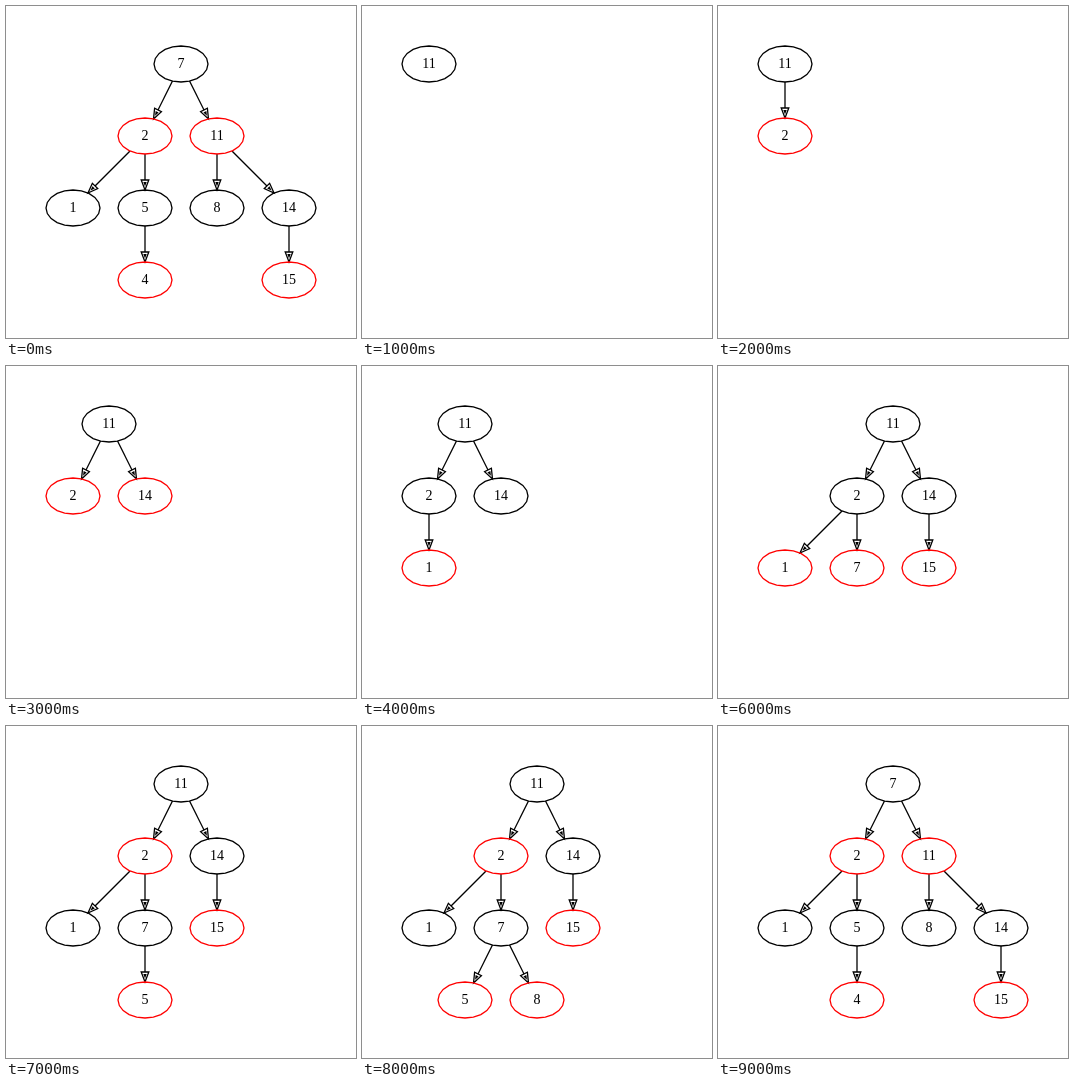
An HTML page with a canvas for the animation above (10 s loop, 350 px wide and 332 px high).

```html
<!DOCTYPE html>
<html lang="en">
<head>
<meta charset="utf-8">
<title>Red-black tree insertion</title>
<style>
  html, body { margin: 0; width: 100%; height: 100%; overflow: hidden; background: #fff; }
  canvas { display: block; }
</style>
</head>
<body>
<canvas id="stage" width="350" height="332"></canvas>
<script>
const ctx = document.getElementById('stage').getContext('2d');
const STEP = 1000;
const RX = 27, RY = 18;
const ELLIPSE_SIDES = 20;
const HEAD_LENGTH = 10, HEAD_HALF_WIDTH = 3.8;

// Columns are 36 px apart, rows 72 px; a node's row is its depth.
const black = (key, col, ...children) => ({ key, col, color: '#000', children });
const red = (key, col, ...children) => ({ key, col, color: '#f00', children });

const finished = black(7, 3,
  red(2, 2, black(1, 0), black(5, 2, red(4, 2))),
  red(11, 4, black(8, 4), black(14, 6, red(15, 6))));

const trees = [
  finished,
  black(11, 0),
  black(11, 0, red(2, 0)),
  black(11, 1, red(2, 0), red(14, 2)),
  black(11, 1, black(2, 0, red(1, 0)), black(14, 2)),
  black(11, 2, black(2, 1, red(1, 0), red(7, 2)), black(14, 3)),
  black(11, 3, black(2, 2, red(1, 0), red(7, 2)), black(14, 4, red(15, 4))),
  black(11, 3, red(2, 2, black(1, 0), black(7, 2, red(5, 2))), black(14, 4, red(15, 4))),
  black(11, 3, red(2, 2, black(1, 0), black(7, 2, red(5, 1), red(8, 3))), black(14, 4, red(15, 4))),
  finished
];

const position = (node, depth) => ({ x: 67 + 36 * node.col, y: 58 + 72 * depth });

function polygon(points) {
  ctx.beginPath();
  for (const [x, y] of points) ctx.lineTo(x, y);
  ctx.closePath();
}

function drawEdge(from, to) {
  const dx = to.x - from.x, dy = to.y - from.y;
  const clip = 1 / Math.hypot(dx / RX, dy / RY);
  const length = Math.hypot(dx, dy) * (1 - 2 * clip);
  const base = length - HEAD_LENGTH;

  ctx.save();
  ctx.translate(from.x + dx * clip, from.y + dy * clip);
  ctx.rotate(Math.atan2(dy, dx));
  ctx.strokeStyle = ctx.fillStyle = '#000';
  ctx.beginPath();
  ctx.moveTo(0, 0);
  ctx.lineTo(base, 0);
  ctx.stroke();
  polygon([[length, 0], [base, -HEAD_HALF_WIDTH], [base, HEAD_HALF_WIDTH]]);
  ctx.stroke();
  polygon([[length - 3.5, 0], [base + 2, -1.7], [base + 2, 1.7]]);
  ctx.fill();
  ctx.restore();
}

function drawNode(node, { x, y }) {
  ctx.strokeStyle = node.color;
  polygon(Array.from({ length: ELLIPSE_SIDES }, (_, i) => {
    const angle = i * 2 * Math.PI / ELLIPSE_SIDES;
    return [x + RX * Math.cos(angle), y + RY * Math.sin(angle)];
  }));
  ctx.stroke();
  ctx.fillStyle = '#000';
  ctx.fillText(node.key, x, y + 4);
}

function drawTree(node, depth = 0) {
  const here = position(node, depth);
  for (const child of node.children) {
    drawEdge(here, position(child, depth + 1));
    drawTree(child, depth + 1);
  }
  drawNode(node, here);
}

function render(time) {
  ctx.fillStyle = '#fff';
  ctx.fillRect(0, 0, 350, 332);
  ctx.lineWidth = 1.3;
  ctx.font = '14px "Liberation Serif", serif';
  ctx.textAlign = 'center';
  drawTree(trees[Math.floor(time / STEP) % trees.length]);
}

const start = performance.now();
function tick() {
  render(performance.now() - start);
  requestAnimationFrame(tick);
}
tick();
</script>
</body>
</html>
```
